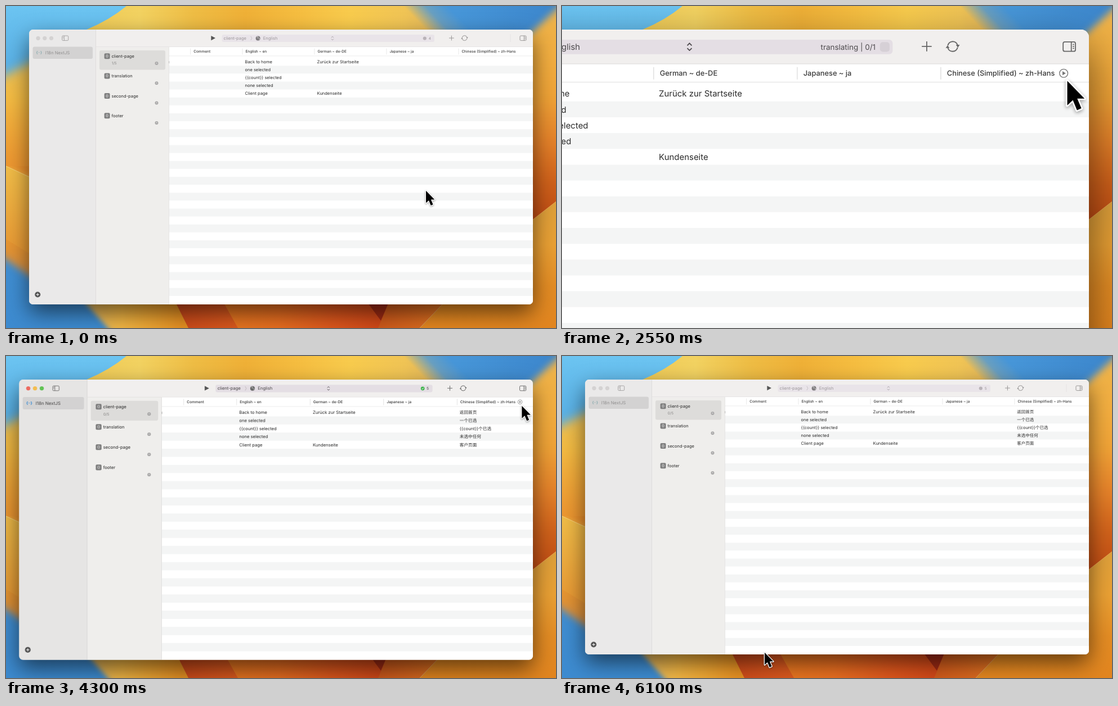
An HTML page with a canvas for the animation above (6150 ms loop, 977 by 573 pixels).

```html
<!DOCTYPE html>
<html lang="en">
<head>
<meta charset="utf-8">
<title>Translating a column</title>
<style>
html, body { margin: 0; width: 100%; height: 100%; overflow: hidden; background: #e9a233; }
canvas { display: block; width: 977px; height: 573px; }
</style>
</head>
<body>
<canvas id="stage" width="977" height="573"></canvas>
<script>
const W = 977, H = 573, LOOP = 6150, STEP = 50;
const SHUTTER = 12, SAMPLES = 8;
const FONT = 'Inter, "Noto Sans CJK SC", "Noto Sans CJK", sans-serif';
const PIVOT = { x: 936, y: 42 };
const ROW = 14.13;

const stage = document.getElementById('stage').getContext('2d');
const layer = () => {
  const c = document.createElement('canvas');
  c.width = W;
  c.height = H;
  return c.getContext('2d');
};
const wall = layer(), scratch = layer();
let g = scratch;

// Drawing helpers

function grad(x0, y0, x1, y1, ...stops) {
  const f = g.createLinearGradient(x0, y0, x1, y1);
  stops.forEach((c, i) => f.addColorStop(i / (stops.length - 1), c));
  return f;
}

function poly(fill, pts, blur = 0) {
  g.save();
  if (blur) g.filter = `blur(${blur}px)`;
  g.fillStyle = fill;
  g.beginPath();
  pts.forEach(([x, y]) => g.lineTo(x, y));
  g.closePath();
  g.fill();
  g.restore();
}

function rect(fill, x, y, w, h, r = 0) {
  g.fillStyle = fill;
  g.beginPath();
  g.roundRect(x, y, w, h, r);
  g.fill();
}

function disc(fill, x, y, r) {
  g.fillStyle = fill;
  g.beginPath();
  g.arc(x, y, r, 0, 7);
  g.fill();
}

function line(color, width, path) {
  g.strokeStyle = color;
  g.lineWidth = width;
  g.stroke(new Path2D(path));
}

function text(s, x, y, size, color, weight = 400, align = 'left') {
  g.font = `${weight} ${size}px ${FONT}`;
  g.textAlign = align;
  g.fillStyle = color;
  g.fillText(s, x, y + size * 0.36);
}

// Wallpaper

function drawWall() {
  g = wall;
  rect(grad(0, 0, 0, H, '#6cc4f1', '#4ba2de', '#418fd2', '#3d8bd0'), 0, 0, W, H);

  g.fillStyle = grad(143, 0, 800, 0, '#efc955', '#f2d261', '#eebd45', '#efb037', '#f5bd40', '#f8cb4d', '#f0c455', '#dcae5e');
  g.beginPath();
  g.moveTo(214, 0);
  g.quadraticCurveTo(184, 25, 143, 42);
  g.lineTo(143, 120);
  g.lineTo(850, 120);
  g.lineTo(850, 0);
  g.fill();

  rect(grad(746, 42, 787, 3, '#4a99da00', '#4a99dacc', '#4796d8'), 680, 0, 297, 62);
  rect(grad(800, 0, 977, 0, '#3c86cc00', '#3c86cc'), 800, 0, 177, 62);

  poly(grad(0, 20, 0, 380, '#eeb248', '#f2ae40', '#efa236', '#e5832a', '#d0631b', '#bf4b13'),
    [[995, -10], [920, 60], [920, 420], [995, 420]], 7);
  poly(grad(0, 350, 0, H, '#dda03b', '#e9a034', '#e38c24', '#e2851f'),
    [[977, 348], [977, H], [735, H], [775, 531], [936, 380]]);
  line('#f3bd6b99', 1, 'M936 380L977 348');

  poly(grad(0, 95, 0, 310, '#e9bd55', '#f3bc43', '#f1a535', '#e88528'),
    [[-30, 138], [60, 92], [60, 320], [-30, 320]], 9);
  poly(grad(0, 285, 0, 490, '#f0bd48', '#edaa3a', '#e69430', '#cf8a43'),
    [[-30, 272], [60, 312], [60, 493], [-30, 430]], 7);
  rect(grad(0, 130, 0, 290, '#f3bc4300', '#ec9530'), 0, 130, 41, 155);
  poly(grad(0, 285, 0, 440, '#f0bd48', '#e79733'), [[0, 285], [41, 304], [41, 440], [0, 415]]);
  line('#f7d27a', 1, 'M0 285L41 304');

  poly(grad(150, 0, 310, 0, '#e2b45a', '#f0b544', '#eca432', '#e48f22'),
    [[125, 510], [196, 590], [340, 590], [310, 510]], 4);
  poly(grad(300, 0, 415, 0, '#c9481a', '#da5a1e'), [[300, 525], [324, H], [420, H], [392, 525]]);
  poly(grad(385, 0, 680, 0, '#e5761f', '#e66d20', '#dc561c', '#cc4417'),
    [[385, 525], [412, H], [690, H], [690, 525]]);
  poly('#9c2a14', [[640, 525], [681, 525], [666, 560]]);
  poly(grad(665, 0, 775, 0, '#cd591b', '#dd7020'), [[681, 525], [778, 528], [735, H], [661, H]]);
  line('#f0b060aa', 1, 'M775 531L735 573');
}

// Motion

// Overdamped spring, falling from 1 to 0.
function settle(ms, slow = 4.5, fast = 15) {
  const s = Math.max(ms, 0) / 1000;
  return (fast * Math.exp(-slow * s) - slow * Math.exp(-fast * s)) / (fast - slow);
}
const zoomAt = t => t < 3350 ? 2 - settle(t - 1385) : 1 + settle(t - 3350);

const path = [
  [0, 745, 327], [150, 757, 317], [300, 785, 292], [450, 814, 238], [600, 840, 180],
  [800, 870, 134], [1000, 894, 102], [1200, 907, 85], [1350, 911, 81], [1500, 915.7, 86],
  [4650, 915.7, 86], [4800, 880, 92], [4950, 778, 110], [5050, 745, 178], [5150, 712, 254],
  [5250, 668, 310], [5400, 561, 401], [5550, 495, 428], [5700, 441, 458], [5900, 386, 500],
  [6100, 359, 526]
];

function slope(i, k) {
  const a = path[i - 1], b = path[i + 1];
  const p = path[i];
  if (!a || !b || a[k] === p[k] || b[k] === p[k]) return 0;
  return (b[k] - a[k]) / (b[0] - a[0]);
}

function cursorAt(t) {
  t = Math.min(Math.max(t, 0), 6100);
  let i = 0;
  while (i < path.length - 2 && t > path[i + 1][0]) i++;
  const a = path[i], b = path[i + 1], d = b[0] - a[0], u = (t - a[0]) / d;
  const v = 1 - u;
  const at = k => a[k] * v * v * (1 + 2 * u) + b[k] * u * u * (3 - 2 * u)
    + d * u * v * (slope(i, k) * v - slope(i + 1, k) * u);
  return { x: at(1), y: at(2) };
}

function stateAt(t) {
  return {
    active: t >= 1600 && t < 6000,
    busy: t >= 1850 && t < 3700,
    filled: t >= 2850,
    done: t >= 3700,
    hover: t < 4900 ? Math.min(Math.max((t - 1250) / 200, 0), 1) : 0
  };
}

// Window

function drawSidebar(s) {
  const lights = s.active ? ['#ee6a5f', '#f4be4f', '#61c354'] : ['#d4d2d2', '#d4d2d2', '#d4d2d2'];
  const icon = s.active ? '#6f6d6d' : '#a09e9e';
  rect(s.active ? '#e6e5e4' : '#eae9e9', 41, 42, 118.5, 489);
  lights.forEach((c, i) => disc(c, 57 + i * 11.75, 57.3, 3.6));
  g.strokeStyle = icon;
  g.lineWidth = 0.9;
  g.beginPath();
  g.roundRect(99.7, 53, 11, 8.4, 1.5);
  g.stroke();
  line(icon, 0.9, 'M103.3 53V61.4M101 55.2h1.2M101 57h1.2');
  rect('#d3d2d2', 47.5, 72.5, 106.5, 21.5, 3);
  text('{··}', 58.8, 83, 6.5, s.active ? '#2385d6' : '#84a9ad', 700, 'center');
  text('I18n NextJS', 69.8, 83.3, 7.8, s.active ? '#4a4949' : '#908e8e');
  disc('#555', 56.2, 513.5, 5);
  line('#fff', 1, 'M53.6 513.5h5.2M56.2 510.9v5.2');
}

function drawList(s) {
  rect('#efeeec', 160, 72, 129.5, 459);
  rect('#dddcda', 166, 79, 117, 34.5, 3);
  ['client-page', 'translation', 'second-page', 'footer'].forEach((name, i) => {
    const y = 89.3 + i * 35.3;
    rect('#7f7f7f', 174.6, y - 5, 10, 10, 2);
    text('{}', 179.6, y - 0.3, 6, '#fff', 500, 'center');
    text(name, 187.5, y, 7.5, '#2c2c2c');
    disc('#a9a8a8', 267.5, y + 12.7, 3);
    line('#dedede', 0.7, `M266 ${y + 12.7}h3M267.5 ${y + 11}v1.7`);
  });
  text(s.done ? '0/5' : '1/5', 187.8, 102, 6.5, '#8b8a89');
}

function drawPill(s) {
  const ink = s.active ? '#4d4a4d' : '#9c979b';
  rect(s.active ? '#e4dee4' : '#e9e4e9', 383.5, 51, 377.5, 13, 3);
  text('client-page', 386.6, 57.4, 7.5, ink);
  line('#bdb7bc', 0.8, 'M434.8 53.8l2 3.6l-2 3.6');
  disc(s.active ? '#666' : '#7c797c', 447.6, 57.4, 4);
  line('#ddd', 0.8, 'M445 55.4l2.4 -.8l.6 2l-1.6 1.6M449 57l1.4 1l-.8 2');
  text('English', 456.8, 57.4, 7.5, ink);
  line(ink, 0.9, 'M577.9 56.2l2 -2l2 2M577.9 58.6l2 2l2 -2');
  if (s.busy) {
    text(`translating | ${s.filled ? 1 : 0}/1`, 745.8, 57.4, 6.75, ink, 400, 'right');
    if (s.filled) line('#4f4d4f', 1.9, 'M753.2 54.6A2.9 2.9 0 1 1 754.6 60.3');
    else rect('#d6d0d6', 749.7, 53.2, 8.6, 8.6, 2.5);
    return;
  }
  if (s.active && s.done) {
    disc('#3fb44e', 744, 57.5, 3.3);
    line('#fff', 0.9, 'M742.4 57.6l1.2 1.3l2 -2.7');
  } else {
    disc('#b9b3b8', 743.8, 57.5, 3.1);
  }
  text(s.done ? '5' : '4', 750.8, 57.5, 6.6, ink);
}

function drawToolbar(s) {
  const icon = s.active ? '#666' : '#8f8d8d';
  rect('#f1efee', 160, 42, 776, 31);
  rect('#e3e1e0', 160, 72.2, 776, 0.8);
  poly('#555', [[364.3, 53], [372, 57.1], [364.3, 61.2]]);
  drawPill(s);
  line(icon, 0.9, 'M787 57h8.8M791.4 52.6v8.8');
  line(icon, 0.95, 'M810.2 56.2A4.5 4.5 0 0 1 818.9 55.8M818.9 57.9A4.5 4.5 0 0 1 810.2 58.3');
  poly(icon, [[817.4, 55.6], [820.8, 55.6], [819.2, 58]]);
  poly(icon, [[808.3, 58.4], [811.7, 58.4], [810, 56]]);
  if (!s.active) line('#e0dede', 0.7, 'M896 50v14');
  g.strokeStyle = icon;
  g.lineWidth = 0.9;
  g.beginPath();
  g.roundRect(913, 53, 11, 8.4, 1.5);
  g.stroke();
  line(icon, 0.9, 'M920.3 53V61.4M921.6 55.2h1.2M921.6 57h1.2M921.6 58.8h1.2');
}

const heads = ['Comment', 'English ~ en', 'German ~ de-DE', 'Japanese ~ ja', 'Chinese (Simplified) ~ zh-Hans'];
const english = ['Back to home', 'one selected', '{{count}} selected', 'none selected', 'Client page'];
const german = ['Zurück zur Startseite', '', '', '', 'Kundenseite'];
const chinese = ['返回首页', '一个已选', '{{count}}个已选', '未选中任何', '客户页面'];

function drawTable(s) {
  rect('#fff', 289.5, 73, 646.5, 458);
  for (let k = 1; k < 31; k += 2) rect('#f4f5f5', 289.5, 92 + k * ROW, 646.5, ROW);
  rect('#e8e8e8', 289.5, 88.6, 646.5, 0.7);
  heads.forEach((h, i) => {
    const x = i ? 291.6 + i * 128 : 327.4;
    rect('#dedede', x, 75.5, 0.7, 11);
    text(h, x + 5.8, 81, 6.45, '#3a3a3a', 500);
  });
  const column = (x, items) => items.forEach((s, i) => text(s, x, 99.2 + i * ROW, 7.5, '#2b2b2b'));
  column(424.5, english);
  column(552.6, german);
  if (s.filled) column(808.3, chinese);
  rect('#777', 289.3, 98, 0.8, 4);
  rect('#dad9d8', 289, 73, 0.6, 458);

  g.globalAlpha = s.hover;
  line('#777', 0.7, 'M909.8 81a3.7 3.7 0 1 0 7.4 0a3.7 3.7 0 1 0 -7.4 0');
  poly('#777', [[912.4, 79.2], [915.4, 81], [912.4, 82.8]]);
  g.globalAlpha = 1;
}

function drawWindow(s, scale) {
  g.save();
  g.shadowColor = 'rgba(0,0,0,.56)';
  g.shadowBlur = 38 * scale;
  g.shadowOffsetY = 15 * scale;
  rect('#f1efee', 41, 42, 895, 489, 7);
  g.restore();

  g.save();
  g.beginPath();
  g.roundRect(41, 42, 895, 489, 7);
  g.clip();
  drawList(s);
  drawToolbar(s);
  drawTable(s);
  drawSidebar(s);
  rect('#d8d7d7', 159.2, 42, 0.7, 489);
  rect('#ffffff80', 41, 42, 895, 0.6);
  g.restore();
}

const arrow = new Path2D('M1 1.8V23.6L6 19L9.7 28L13.6 26.3L9.9 17.6H16.4Z');

function drawCursor({ x, y }, scale) {
  g.save();
  g.translate(x, y);
  g.lineJoin = 'round';
  g.shadowColor = 'rgba(0,0,0,.4)';
  g.shadowBlur = 3 * scale;
  g.shadowOffsetY = scale;
  g.strokeStyle = '#fff';
  g.lineWidth = 2.6;
  g.stroke(arrow);
  g.shadowColor = 'transparent';
  g.fillStyle = '#000';
  g.fill(arrow);
  g.restore();
}

// Scene

function drawScene(t, state) {
  const z = zoomAt(t);
  g = scratch;
  g.textRendering = 'geometricPrecision';
  g.drawImage(wall.canvas, 0, 0);
  g.save();
  g.translate(PIVOT.x, PIVOT.y);
  g.scale(z, z);
  g.translate(-PIVOT.x, -PIVOT.y);
  drawWindow(state, z);
  drawCursor(cursorAt(t), z);
  g.restore();
}

function moves(t) {
  const a = cursorAt(t - SHUTTER / 2), b = cursorAt(t + SHUTTER / 2);
  const dz = zoomAt(t + SHUTTER / 2) - zoomAt(t - SHUTTER / 2);
  return Math.hypot(b.x - a.x, b.y - a.y) > 0.5 || Math.abs(dz) > 0.0005;
}

// Averages several instants inside the shutter for motion blur.
function render(t) {
  const state = stateAt(t), n = moves(t) ? SAMPLES : 1;
  for (let i = 0; i < n; i++) {
    const shift = n > 1 ? (i / (n - 1) - 0.5) * SHUTTER : 0;
    drawScene(t + shift, state);
    stage.globalAlpha = 1 / (i + 1);
    stage.drawImage(scratch.canvas, 0, 0);
  }
}

drawWall();
const start = performance.now();
let shown = -1;

function tick() {
  const t = Math.floor((performance.now() - start) % LOOP / STEP) * STEP;
  if (t !== shown) render(shown = t);
  requestAnimationFrame(tick);
}
tick();
</script>
</body>
</html>
```
